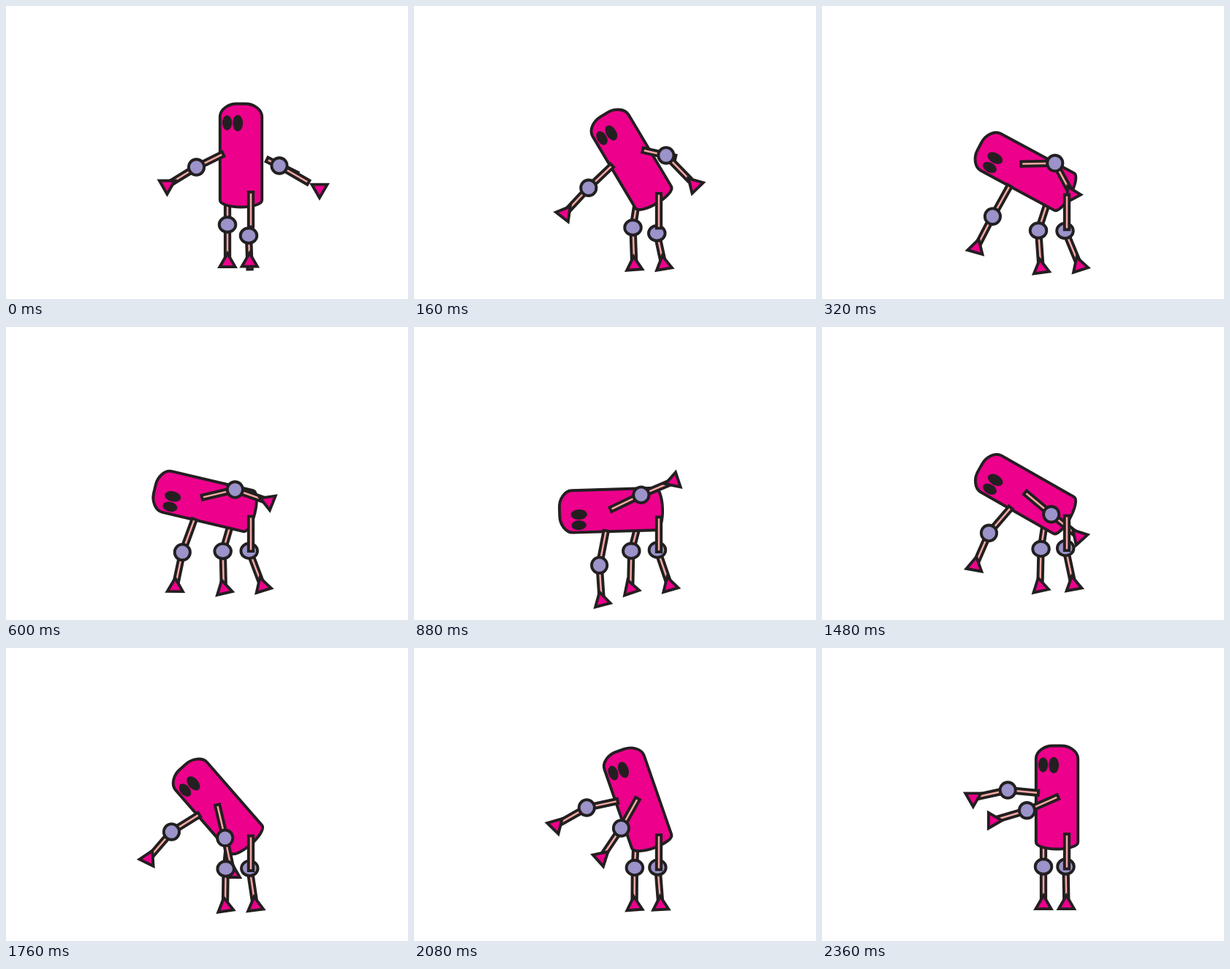
An HTML page with a canvas for the animation above (2400 ms loop, 550x400 px).

```html
<!DOCTYPE html>
<html lang="en">
<head>
<meta charset="utf-8">
<title>Bending robot</title>
<style>
html, body { margin: 0; width: 100%; height: 100%; overflow: hidden; background: #fff; }
canvas { display: block; }
</style>
</head>
<body>
<canvas id="stage" width="550" height="400"></canvas>
<script>
const ctx = document.getElementById('stage').getContext('2d');
const LOOP = 2400, STEP = 40, BONE = 46;
const INK = '#231f20', PINK = '#ec008c', SKIN = '#f7a9a3', JOINT = '#9b93c9';

const rad = deg => deg * Math.PI / 180;
const mix = (a, b, k) => a.map((v, i) => v + (b[i] - v) * k);
const along = ([x, y], deg, d) => [x + d * Math.cos(rad(deg)), y + d * Math.sin(rad(deg))];

// Shoulders are relative to the leaning body, knees to the stage; angles in degrees
const arm = (x, y, upper, lower, hand, elbow = 46.5, reach = 48.5) =>
  [x, y, upper, lower, hand, elbow, reach];
const leg = (x, y, thigh, shin, foot, reach = 51.5) => [x, y, thigh, shin, foot, reach];

// The figure stands, drops, bends fully, then rises; every part turns evenly between poses
const poses = [
  { at: 0, body: [321.5, 250, 0],
    farArm: arm(-24.5, -48, 153.7, 148.5, 60, 40.7, 47),
    nearArm: arm(35.5, -40.5, 26.6, 30, -60, 19, 63.5),
    farLeg: leg(303, 298.5, -90, 90, 0),
    nearLeg: leg(332, 313.5, -90, 88, 0, 36) },
  { at: 320, body: [318.1, 246.5, 61.7],
    farArm: arm(-28, -54.5, 119.2, 117.5, 16, 48),
    nearArm: arm(5.5, -55, -1.2, 61.6, -28),
    farLeg: leg(296, 306.5, -72, 86, -8),
    nearLeg: leg(332.5, 307, -90, 67.5, -18) },
  { at: 960, body: [315.2, 249.3, 96],
    farArm: arm(-27.5, -53.5, 98.4, 81.7, -19, 48),
    nearArm: arm(0.5, -45.5, -29, -35, -120),
    farLeg: leg(297.5, 305.5, -76, 92, -20),
    nearLeg: leg(333, 304, -90, 71.5, -16) },
  { at: 2360, body: [321.5, 250, 0],
    farArm: arm(-25.5, -52, 185.4, 167.6, 60, 42),
    nearArm: arm(1.5, -47, 156.2, 163.6, 90),
    farLeg: leg(303, 298.5, -90, 90, 0),
    nearLeg: leg(333.5, 298.5, -90, 89, 0) }
];

function poseAt(t) {
  const i = Math.max(1, poses.findIndex(p => p.at >= t));
  const a = poses[i - 1], b = poses[i], k = (t - a.at) / (b.at - a.at);
  return part => mix(a[part], b[part], k);
}

function place([x, y], deg, draw) {
  ctx.save();
  ctx.translate(x, y);
  ctx.rotate(rad(deg));
  ctx.beginPath();
  draw();
  ctx.restore();
}

function paint(fill) {
  ctx.fillStyle = fill;
  ctx.fill();
  ctx.lineWidth = 3.9;
  ctx.strokeStyle = INK;
  ctx.stroke();
}

function bar(p, deg, length = BONE) {
  place(p, deg, () => {
    ctx.rect(0, -3.2, length, 6.4);
    paint(SKIN);
  });
}

function knob(p, rx, ry) {
  place(p, 0, () => {
    ctx.ellipse(0, 0, rx, ry, 0, 0, 7);
    paint(JOINT);
  });
}

function tip(p, deg) {
  place(p, deg, () => {
    for (let a = 0; a < 360; a += 120) ctx.lineTo(...along([0, 0], a - 90, 12.2));
    ctx.closePath();
    paint(PINK);
  });
}

function eye(x, y, rx, ry) {
  ctx.beginPath();
  ctx.ellipse(x, y, rx, ry, 0, 0, 7);
  ctx.fillStyle = INK;
  ctx.fill();
}

function drawBody([x, y, lean]) {
  place([x, y], -lean, () => {
    ctx.moveTo(-28.7, -99);
    ctx.bezierCurveTo(-28.7, -109, -17, -116.5, -6, -116.5);
    ctx.lineTo(6, -116.5);
    ctx.bezierCurveTo(17, -116.5, 28.7, -109, 28.7, -99);
    ctx.lineTo(28.7, 15);
    ctx.bezierCurveTo(28.7, 21, 14, 24.5, 0, 24.5);
    ctx.bezierCurveTo(-14, 24.5, -28.7, 21, -28.7, 15);
    ctx.closePath();
    paint(PINK);
    eye(-19, -90.5, 6.6, 10.2);
    eye(-4.4, -90, 7, 11.2);
  });
}

function drawArm([x, y, upper, lower, hand, elbow, reach], [bx, by, lean]) {
  const c = Math.cos(rad(lean)), s = Math.sin(rad(lean));
  const shoulder = [bx + x * c + y * s, by - x * s + y * c];
  const joint = along(shoulder, upper, elbow);
  bar(shoulder, upper);
  bar(joint, lower);
  knob(joint, 10.6, 10.8);
  tip(along(joint, lower, reach), hand);
}

function drawShin([x, y, , shin]) {
  bar([x, y], shin);
  knob([x, y], 11.3, 10.2);
}

function drawFoot([x, y, , shin, foot, reach]) {
  tip(along([x, y], shin, reach), foot);
}

function render(t) {
  const get = poseAt(t);
  const body = get('body'), far = get('farLeg'), near = get('nearLeg');
  ctx.clearRect(0, 0, 550, 400);

  bar(far, far[2], 44);
  drawBody(body);
  drawArm(get('farArm'), body);
  drawArm(get('nearArm'), body);
  drawShin(far);
  drawFoot(far);

  // The near thigh hangs in front of its knee and sinks a little with the lean
  drawShin(near);
  bar([335, 254 + body[2] * 0.06], 90, 47.5);
  drawFoot(near);
}

const start = performance.now();
function tick() {
  const t = (performance.now() - start) % LOOP;
  render(Math.floor(t / STEP) * STEP);
  requestAnimationFrame(tick);
}
tick();
</script>
</body>
</html>
```
